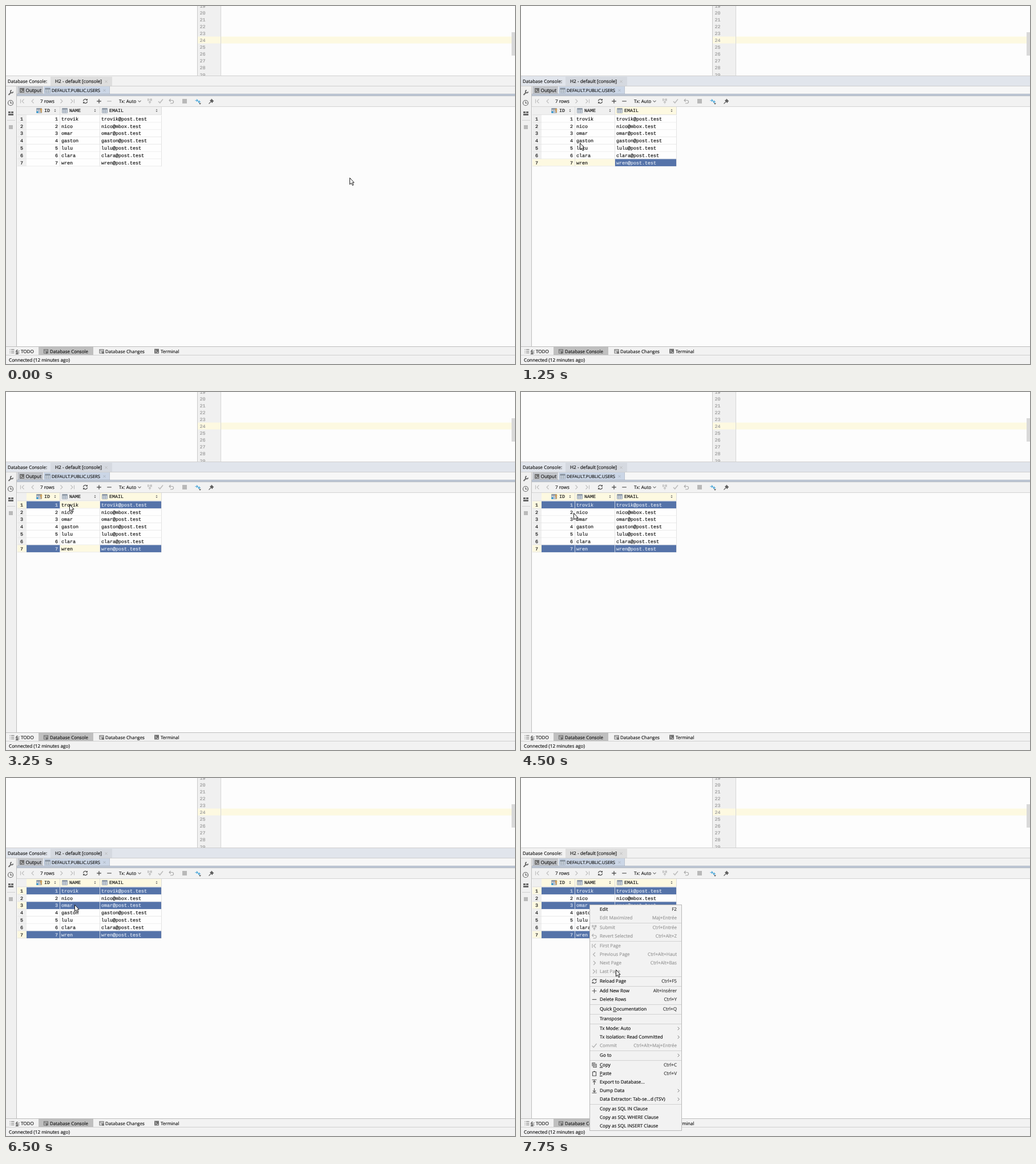
An HTML page that plays this animation: 892 px wide and 628 px high, repeating every 8 s.

```html
<!DOCTYPE html>
<html lang="en">
<head>
<meta charset="utf-8">
<title>Database console</title>
<style>
html, body { margin: 0; width: 100%; height: 100%; overflow: hidden; background: #fdfdfd; }
svg { display: block; width: 892px; height: 628px; }
text { font: 8.1px "Open Sans", "Noto Sans", sans-serif; white-space: pre; text-rendering: geometricPrecision; stroke-width: .18; }
.mono { font-family: "Liberation Mono", "DejaVu Sans Mono", monospace; }
.u { text-decoration: underline; }
</style>
</head>
<body>
<svg viewBox="0 0 892 628">
  <g id="scene"></g>
  <path id="cursor" d="M.5.5V12L3.2 9.5L5.2 13.7L7 12.9L5.1 8.8H8.1Z" fill="#fff" stroke="#111" stroke-width=".95"/>
</svg>
<script>
const LOOP = 8000, STEP = 250;
const INK = '#161616', DIM = '#989898', ICON = '#6e6e6e', OFF = '#bcbcbc';
const BAR = '#f2f2f2', YELLOW = '#fdf9e1', BLUE = '#5573a9';

const rect = (x, y, w, h, fill) => `<rect x="${x}" y="${y}" width="${w}" height="${h}" fill="${fill}"/>`;
// y is the vertical middle of the line; "_" underlines the next letter
const text = (x, y, s, { fill = INK, size = 8.1, anchor = 'start' } = {}) =>
  `<text x="${x}" y="${y + 2.9}" fill="${fill}" stroke="${fill}" text-anchor="${anchor}" style="font-size:${size}px">${
    s.replace(/_(.)/, '<tspan class="u">$1</tspan>')}</text>`;
const mono = (x, y, s, fill = INK, anchor = 'start') =>
  `<text class="mono" x="${x}" y="${y + 2.6}" fill="${fill}" stroke="${fill}" text-anchor="${anchor}" style="font-size:8.35px">${s}</text>`;
const path = (x, y, d, stroke = ICON, width = 1.1, fill = 'none') =>
  `<path transform="translate(${x} ${y})" d="${d}" stroke="${stroke}" stroke-width="${width}" fill="${fill}"/>`;

const GLYPHS = {
  first: 'M-3.5-3.5v7M2.5-3.5L-1 0l3.5 3.5',
  prev: 'M1.5-3.5L-2 0l3.5 3.5',
  next: 'M-1.5-3.5L2 0l-3.5 3.5',
  last: 'M3.5-3.5v7M-2.5-3.5L1 0l-3.5 3.5',
  reload: 'M-3.6-.4A3.6 3.6 0 0 1 2.8-2.2M3.6 .4A3.6 3.6 0 0 1-2.8 2.2M3.4-4v2.2h-2.2M-3.4 4v-2.2h2.2',
  add: 'M-3.8 0h7.6M0-3.8v7.6',
  remove: 'M-3.8 0h7.6',
  ok: 'M-4 .2l2.7 2.8L4-3.5',
  undo: 'M-1.5-4L-4-1.5L-1.5 1M-4-1.5h5a2.6 2.6 0 0 1 0 5.2h-3',
  submit: 'M-3.5-4v3h1.5l.8-1.5l-.8-1.5zM1-4v3h2.2v-3zM1-2.5h2M0 4.5v-4M-2 2.3L0 .3l2 2',
  copy: 'M-1.5-1.5h5v5.5h-5zM-3.5 2v-5.7h5.2M0 .3h2M0 2h2',
  paste: 'M-3-3h6v7h-6zM-1.3-4h2.6',
  upload: 'M-4-4h8M0 4.5v-6.5M-2.5 0L0-2.5l2.5 2.5',
  download: 'M-4 4h8M0-4.5v6.5M-2.5 0L0 2.5l2.5-2.5',
  close: 'M-2-2l4 4M2-2l-4 4',
  down: 'M-2.5-1.2L0 1.3l2.5-2.5',
  sub: 'M-1.3-2.7L1.3 0l-2.6 2.7',
  table: 'M-4.5-4h9v8h-9zM-4.5-1.5h9M-1.5-4v8M1.5-1.5v5.5M-4.5 1.2h9',
  sort: 'M-1.6-.8L0-2.6l1.6 1.8zM-1.6.8L0 2.6l1.6-1.8z',
  list: 'M-1.5-3h5.5M-1.5 0h5.5M-1.5 3h5.5M-4-3h1.2M-4 0h1.2M-4 3h1.2',
  stack: 'M-3.5-3h7v6.5h-7zM-3.5-.8h7M-1 1.3h4',
};
const icon = (name, x, y, color = ICON, width) => path(x, y, GLYPHS[name], color, width);
const grid = (x, y) => path(x, y, GLYPHS.table, '#8896a6', .8, '#e4e9ee') + rect(x - 4, y - 4, 8, 2, '#8a949f');
const prompt = (x, y) => rect(x - 4, y - 4, 8, 8, ICON) + path(x, y, 'M-2.5-2L-.5 0l-2 2M.3 2h2.5', '#fff', .9);

const users = ['trovik', 'nico', 'omar', 'gaston', 'lulu', 'clara', 'wren']
  .map((name, i) => [i + 1, name, `${name}@${i == 1 ? 'mbox' : 'post'}.test`]);
const columns = [
  { title: 'ID', x: 36, w: 58 }, { title: 'NAME', x: 95, w: 69 }, { title: 'EMAIL', x: 165, w: 107 },
];

// label | shortcut or ">" | icon | "off" when disabled; "-" is a separator
const menu = `Edit|F2
Edit Maximized|Maj+Entrée||off
-
Submit|Ctrl+Entrée|submit|off
Revert Selected|Ctrl+Alt+Z|undo|off
-
First Page||first|off
Previous Page|Ctrl+Alt+Haut|prev|off
Next Page|Ctrl+Alt+Bas|next|off
Last Page||last|off
-
Reload Page|Ctrl+F5|reload
-
Add New Row|Alt+Insérer|add
Delete Rows|Ctrl+Y|remove
-
Quick _Documentation|Ctrl+Q
-
Transpose
-
Tx Mode: Auto|>
Tx Isolation: Read Committed|>
Commit|Ctrl+Alt+Maj+Entrée|ok|off
-
Go to|>
-
_Copy|Ctrl+C|copy
_Paste|Ctrl+V|paste
Export to Database...||upload
Dump Data|>|download
Data Extractor: Tab-se...d (TSV)|>
-
Copy as SQL IN Clause
Copy as SQL WHERE Clause
Copy as SQL INSERT Clause`.split('\n').map(line => line.split('|'));

function drawEditor() {
  let s = rect(0, 0, 892, 123, '#fdfdfd') + rect(336, 0, 40, 123, '#f0f0f0')
    + rect(336, 53.6, 556, 12.1, YELLOW) + rect(335, 0, 1, 123, '#c9c9c9') + rect(376, 0, 1, 123, '#d6d6d6')
    + rect(886, 46, 6, 41, '#d9d9d9');
  for (let n = 19; n < 30; n++) s += mono(349.5, 12 + (n - 20) * 12.1, n, '#999', 'end');
  return s;
}

function drawHeader(focus) {
  return rect(0, 123, 892, 18, focus ? '#e1e5ec' : BAR) + rect(0, 122, 892, 1, '#d0d0d0')
    + rect(78, 124, 108, 16, focus ? '#d5d9e0' : '#dedede')
    + text(3, 132, 'Database Console:', { size: 7.98 }) + text(86, 132, 'H2 - default [console]', { size: 8.25 })
    + icon('close', 175.5, 132.5, '#b4b4b4', .9)
    + rect(0, 140, 892, 1, '#cfcfcf') + rect(19, 141, 873, 14, focus ? '#f7f7f7' : BAR)
    + rect(20, 141, 45, 14, '#c2c5ca') + rect(66, 141, 115, 14, '#cbd6e6') + rect(181, 141, 1, 14, '#b9c2cf')
    + rect(19, 154, 873, 1, '#a9b2c0') + rect(19, 155, 873, 2, '#c3ccda') + rect(19, 157, 873, 1, '#a9b0ba')
    + prompt(28, 148) + text(34.5, 148, 'Output', { size: 8.3 })
    + grid(73, 148) + text(80, 148, 'DEFAULT.PUBLIC.USERS', { size: 7.7 })
    + icon('close', 172.5, 148, '#a8b0ba', .9);
}

function drawToolbar(active) {
  const y = 167, edit = active ? ICON : OFF;
  return rect(19, 158, 873, 18, BAR) + rect(19, 176, 873, 1, '#d4d4d4')
    + icon('first', 29, y, OFF) + icon('prev', 47, y, OFF) + text(60, y, '7 rows')
    + icon('next', 97, y, OFF) + icon('last', 116, y, OFF)
    + icon('reload', 139, y, '#555', 1.2) + icon('add', 163, y, '#555', 1.4) + icon('remove', 181, y, edit, 1.4)
    + text(198, y, 'Tx: Auto', { size: 8 }) + icon('down', 234, y)
    + icon('submit', 252, y, OFF) + icon('ok', 271, y, OFF, 1.6) + icon('undo', 290, y, '#aaa')
    + rect(309, 163, 8, 8, '#b9b9b9')
    + path(336, y, 'M-4.5-1.3h4M-2-3.3l2 2l-2 2M5 1h-4M3-1l-2 2l2 2', '#389fd6', 1.1)
    + path(340, 171.5, 'M-2-1h4L0 1.3z', 'none', 0, '#444')
    + path(360, y, 'M0-4.5L4.5 0L3 .5L1.5 3.2L-3-1.3L-.3-3z', 'none', 0, '#5f5f5f') + path(360, y, 'M-.5.5l-4 4', '#5f5f5f');
}

function drawSide() {
  return rect(0, 141, 18, 456, '#f0f0f0') + rect(18, 141, 1, 456, '#bdbdbd')
    + path(8, 152, 'M-3.5 4L1-.5', '#666', 2) + path(8.8, 150.8, 'M1-3A2.3 2.3 0 1 0 3.6-.4', '#666', 1.7)
    + path(8, 170, 'M-4.5 0a4.5 4.5 0 1 0 9 0a4.5 4.5 0 1 0-9 0M0-2.8V.3h2.5', '#666', 1.2)
    + rect(4, 185, 4, 3, '#666') + rect(9, 185, 4, 3, '#666') + rect(4, 189, 9, 3, '#666')
    + rect(2, 200, 14, 1, '#cfcfcf') + rect(5, 209, 7, 7, '#b9b9b9');
}

function drawTable({ rows, cols }) {
  const pitch = 12.8;
  let s = rect(19, 177, 873, 420, '#fcfcfc') + rect(20, 177, 252, 14, '#f0f0f0') + rect(20, 191, 16, 90, '#f0f0f0');
  columns.forEach(({ title, x, w }, c) => {
    if (cols.includes(c)) s += rect(x, 177, w, 14, YELLOW);
    s += grid(c ? x + 8 : 58, 183.5) + mono(c ? x + 16 : 67, 183.7, title)
      + path(c ? x + w - 8 : 86, 183.3, GLYPHS.sort, 'none', 0, '#666') + rect(x + w, 177, 1, 14, '#dcdcdc');
  });
  s += path(61.5, 183.5, 'M-1.3-1.8a1.3 1.3 0 1 0 2.6 0a1.3 1.3 0 1 0-2.6 0M0-.5v4M0 2.3h1.6', '#dc9a3c')
    + `<circle cx="55" cy="186.3" r="1.8" fill="#389fd6"/>` + rect(20, 190.3, 252, 1, '#e0e0e0');

  users.forEach((user, r) => {
    const top = 191.7 + r * pitch, mid = 198.2 + r * pitch;
    const marked = rows.includes(r);
    if (marked) s += rect(20, top, 16, pitch, YELLOW);
    s += mono(27.5, mid, r + 1, INK, 'middle') + rect(20, top + pitch - 1, 252, 1, '#e6e6e6');
    columns.forEach(({ x, w }, c) => {
      const on = marked && cols.includes(c);
      s += rect(x, top, w, pitch - (on ? .2 : 1), on ? BLUE : marked ? YELLOW : '#fefefe')
        + mono(c ? x + 2 : 91, mid, user[c], on ? '#dfe7f2' : INK, c ? 'start' : 'end')
        + rect(x + w, top, 1, pitch, on && c < 2 ? '#c9d2e2' : '#e2e2e2');
    });
  });
  return s;
}

function drawFooter() {
  return rect(0, 597, 892, 31, BAR) + rect(0, 597, 892, 1, '#bdbdbd') + rect(57, 598, 96, 14, '#bfbfbf')
    + rect(0, 612, 892, 1, '#cfcfcf')
    + icon('list', 10.5, 605.5) + text(17, 606, '_6: TODO')
    + icon('stack', 70, 605.5) + path(72, 608, 'M-2-2.5L2 0l-4 2.5z', 'none', 0, '#666')
    + text(77, 606, 'Database Console', { size: 7.98 })
    + icon('stack', 167.5, 605.5) + rect(168, 606, 4, 4, '#777') + text(174, 606, 'Database Changes', { size: 7.96 })
    + prompt(264, 605.5) + text(271, 606, 'Terminal', { size: 8 })
    + text(5, 621, 'Connected (12 minutes ago)', { size: 8.2 });
}

function drawMenu() {
  let y = 230.5, s = rect(120, 222, 162, 397, '#b9b9b9') + rect(121, 223, 160, 395, BAR);
  for (const [label, key = '', glyph, off] of menu) {
    if (label == '-') {
      s += rect(121, Math.round(y - 7), 160, 1, '#d2d2d2');
      y += 2;
      continue;
    }
    s += text(138, y, label, { fill: off ? DIM : INK });
    if (key == '>') s += icon('sub', 276, y, '#777', 1);
    else s += text(273, y, key, { fill: off ? DIM : '#3c3c3c', anchor: 'end' });
    if (glyph) s += icon(glyph, 128.5, y, off ? '#b0b0b0' : '#5c5c5c', 1.2);
    y += 15;
  }
  return s;
}

const states = [
  { from: 0, rows: [], cols: [] },
  { from: 750, rows: [6], cols: [2], focus: true },
  { from: 2500, rows: [0, 6], cols: [2], focus: true },
  { from: 3000, rows: [0, 6], cols: [0, 2], focus: true },
  { from: 3500, rows: [0, 6], cols: [0, 1, 2], focus: true },
  { from: 5500, rows: [0, 2, 6], cols: [0, 1, 2], focus: true },
  { from: 7000, rows: [0, 2, 6], cols: [0, 1, 2], menu: true },
];

// time, x, y of the pointer tip
const track = [
  [0, 602, 301], [500, 300, 290], [750, 215, 274], [1250, 103, 240], [1500, 77, 171], [1750, 172, 246],
  [2000, 172, 246], [2500, 195, 197], [3000, 76, 197], [3250, 111, 197], [3750, 111, 197],
  [4500, 92, 212], [5000, 106, 232], [5500, 117, 226], [6000, 118, 223], [6250, 118, 223],
  [6500, 120, 222], [7250, 120, 222], [7750, 166, 336],
];

function pointer(t) {
  const i = track.findIndex(k => k[0] > t);
  if (i < 0) return track[track.length - 1].slice(1);
  const [t0, x0, y0] = track[i - 1], [t1, x1, y1] = track[i], f = (t - t0) / (t1 - t0);
  return [Math.round(x0 + (x1 - x0) * f), Math.round(y0 + (y1 - y0) * f)];
}

const scene = document.getElementById('scene'), cursor = document.getElementById('cursor');
let shown;
function tick() {
  const t = Math.floor(performance.now() % LOOP / STEP) * STEP;
  const state = states.filter(s => s.from <= t).pop();
  if (state != shown) {
    shown = state;
    scene.innerHTML = drawEditor() + drawHeader(state.focus) + drawToolbar(state.rows.length)
      + drawTable(state) + drawSide() + drawFooter() + (state.menu ? drawMenu() : '');
  }
  cursor.setAttribute('transform', `translate(${pointer(t)})`);
  requestAnimationFrame(tick);
}
tick();
</script>
</body>
</html>
```
